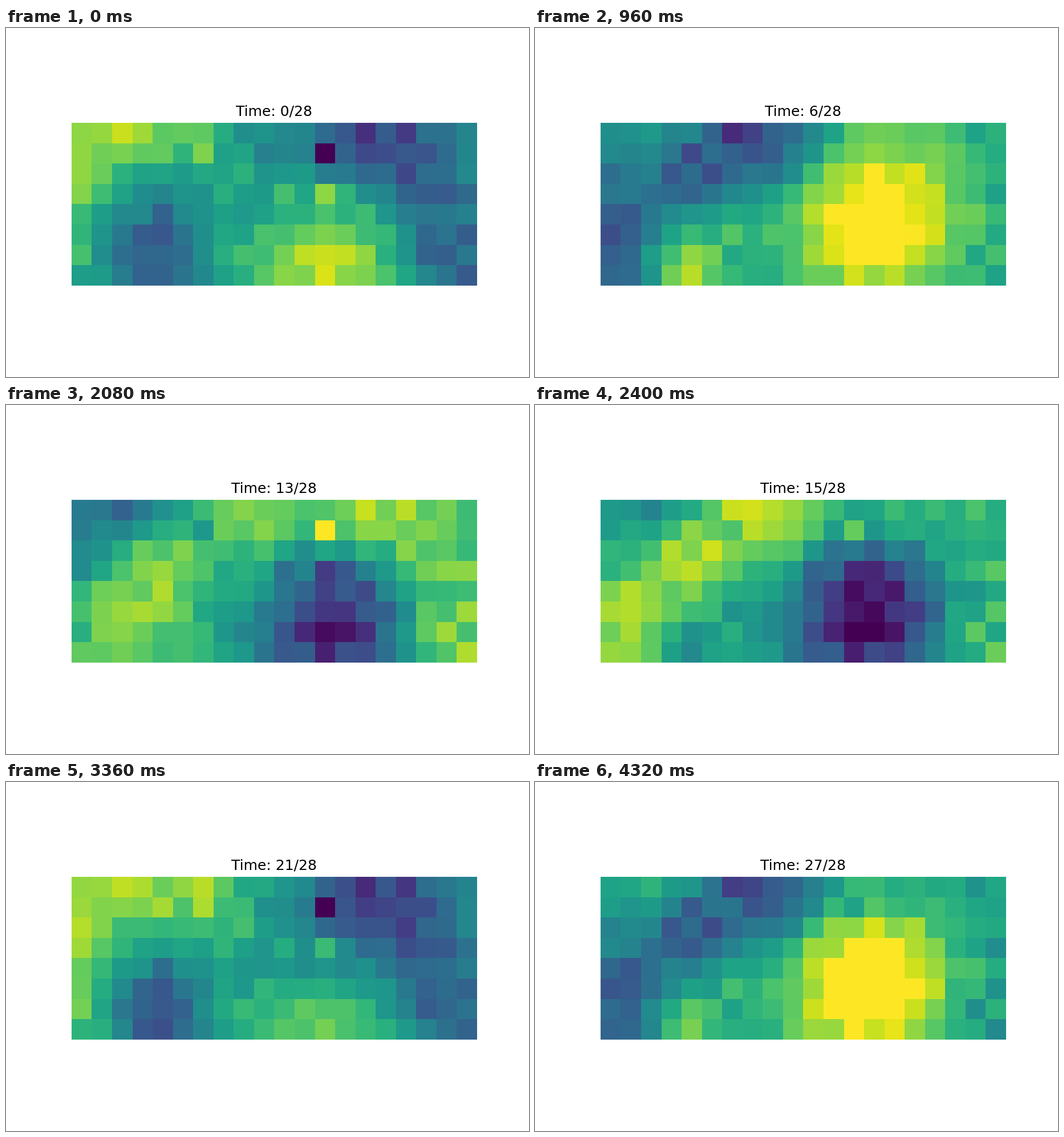
Recreate the animation shown at these times as a matplotlib script. Size 917x611 px, loop 4480 ms.

```python
import matplotlib.pyplot as plt
import numpy as np
from matplotlib.animation import FuncAnimation

W, H, DPI = 917, 611, 150
ROWS, COLS = 8, 20
STEPS, PERIOD = 28, 22.2
LEAD = 7  # steps from the first pattern's peak to the second's
MEAN, GRAIN = 0.59, 0.04

y, x = np.mgrid[:ROWS, :COLS]
rng = np.random.default_rng(4)


def blob(cx, cy, sx, sy, height):
    return height * np.exp(-((x - cx) / sx) ** 2 / 2 - ((y - cy) / sy) ** 2 / 2)


def grain():
    return rng.normal(0, GRAIN, (ROWS, COLS))


# Pattern that peaks one step before the loop starts
early = grain() + sum([
    blob(3, 0, 3.3, 1.7, 0.26),         # bright top left
    blob(0, 3.5, 0.8, 3, 0.20),         # bright left edge
    blob(6, 0.5, 0.5, 0.7, 0.18),
    blob(3.7, 6, 1.5, 1.8, -0.40),      # dark lower left
    blob(14.3, 0.4, 2.7, 1.9, -0.42),   # dark top right
    blob(17, 3.8, 1.7, 1.8, -0.22),     # dark right side
    blob(19, 6.8, 1.6, 1.5, -0.24),
    blob(12, 6.8, 2.2, 1.2, 0.20),      # bright bottom
    blob(12, 1, 0.3, 0.3, -0.30),       # two cells that stand out
    blob(12, 3, 0.3, 0.3, 0.28),
])

# Pattern that peaks a third of a cycle later
late = grain() + sum([
    blob(13, 4.2, 2.9, 2.9, 0.50),      # large bright centre
    blob(7.2, 0, 2.4, 2, -0.40),        # dark top
    blob(0.3, 4.8, 2, 2.6, -0.34),      # dark left
    blob(3.8, 2.3, 1.3, 1.2, -0.16),
    blob(3.7, 6.5, 1.2, 1.4, 0.32),     # bright lower left
])


def field(t):
    """Mix both patterns so that the wave passes from one to the other."""
    w = 2 * np.pi / PERIOD
    since = t + 1
    wave = early * np.sin(w * (LEAD - since)) + late * np.sin(w * since)
    return MEAN + wave / np.sin(w * LEAD)


# The tiny margin keeps the pixel size from being rounded down
fig, ax = plt.subplots(figsize=((W + 1e-3) / DPI, (H + 1e-3) / DPI), dpi=DPI)
image = ax.imshow(field(0), cmap="viridis", vmin=0, vmax=1,
                  interpolation="nearest")
ax.axis("off")
title = ax.set_title(f"Time: 0/{STEPS}", fontsize=12, family="DejaVu Sans")


def update(t):
    image.set_data(field(t))
    title.set_text(f"Time: {t}/{STEPS}")
    return image, title


anim = FuncAnimation(fig, update, frames=STEPS, interval=160,
                     repeat=True, repeat_delay=0, blit=False)
plt.show()
```
